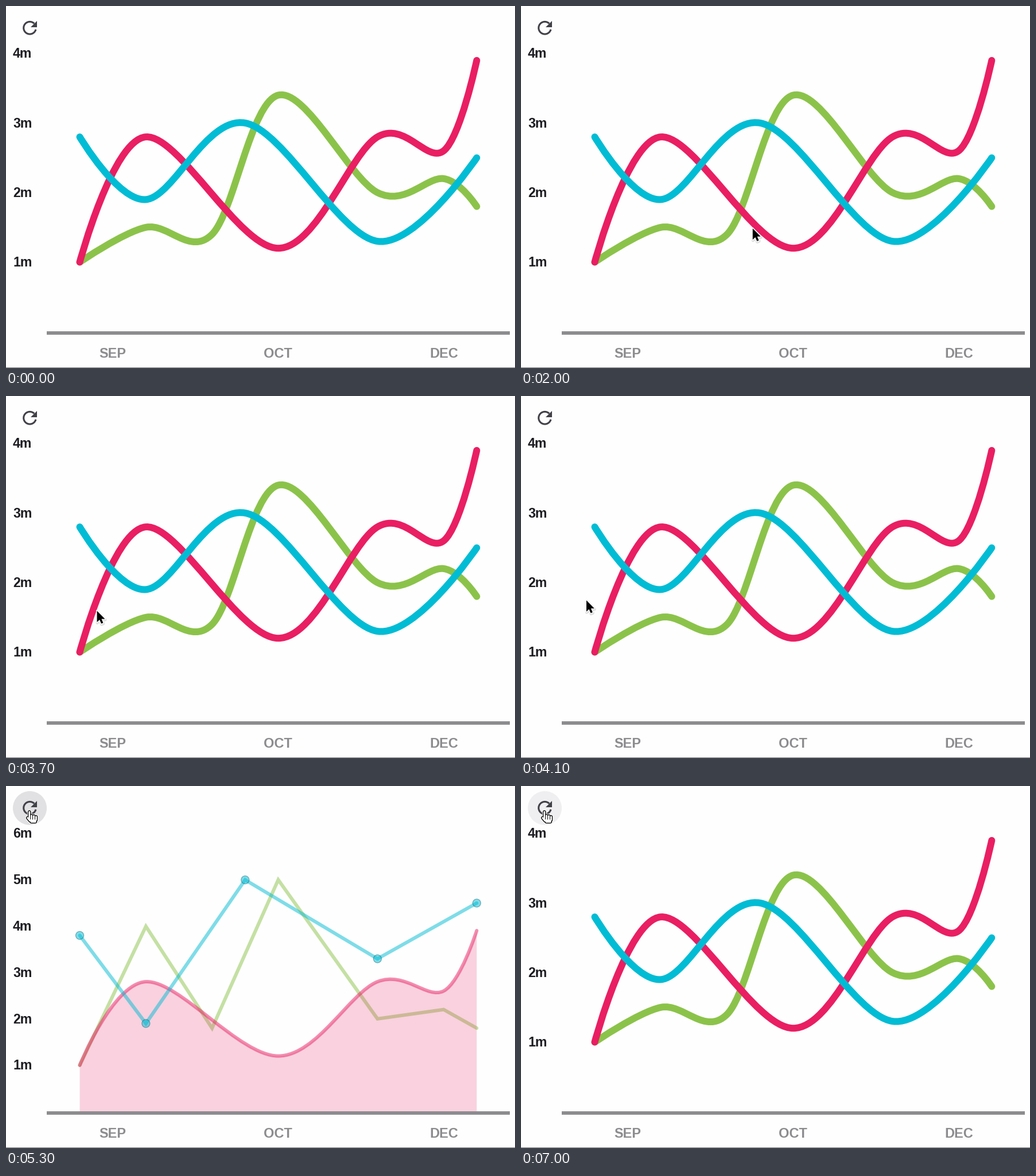
Animation of 887x631 px, one loop 8.6 s. Source, as a matplotlib script:

```python
import numpy as np
import matplotlib.pyplot as plt
from matplotlib.animation import FuncAnimation
from matplotlib.patches import Arc, Circle, PathPatch, Polygon, Rectangle
from matplotlib.path import Path

W, H, DPI = 887, 631, 64
PT = 72 / DPI                      # points per pixel
STEP, LOOP = 100, 8600
BASE, PLOT_H = 567.7, 485          # zero line and height of the value range
X0, DX = 128.5, 57.65

GREEN, PINK, CYAN = "#8bc34a", "#e91e63", "#00bcd4"
GREY, INK, ICON_INK = "#8c8c8f", "#1b1b20", "#414148"

# colour, {slot: value} in the smooth view, changed values in the straight view
SERIES = [
    (GREEN, {0: 1, 2: 1.5, 4: 1.4, 6: 3.4, 9: 2, 11: 2.2, 12: 1.8},
     {2: 4, 4: 1.8, 6: 5}),
    (PINK, {0: 1, 2: 2.8, 6: 1.2, 9: 2.8, 11: 2.6, 12: 3.9}, {}),
    (CYAN, {0: 2.8, 2: 1.9, 5: 3, 9: 1.3, 12: 2.5},
     {0: 3.8, 5: 5, 9: 3.3, 12: 4.5}),
]

POINTER_IN, HAND_FROM, HOVER = 400, 4700, 5000
TO_STRAIGHT, TO_SMOOTH, MORPH = 5010, 6410, 300

fig = plt.figure(figsize=(W / DPI, H / DPI), dpi=DPI, facecolor="#fefefe")
ax = fig.add_axes([0, 0, 1, 1])
ax.set_xlim(0, W)
ax.set_ylim(H, 0)
ax.axis("off")


def add(patch, z):
    patch.set_zorder(z)
    return ax.add_patch(patch)


def label(x, y, text, size, color, ha):
    return ax.text(x, y, text, fontsize=size * PT, color=color, ha=ha,
                   va="baseline", family="Liberation Sans", weight="bold")


def level(values, top):
    return BASE - np.asarray(values) * PLOT_H / top


def progress(now, start, end):
    return min(max((now - start) / (end - start), 0), 1)


def quad(t):
    return 2 * t * t if t < 0.5 else 1 - 2 * (1 - t) ** 2


def glide(now, start, end):
    t = progress(now, start, end)
    return t * t * (3 - 2 * t)


def curve(points):
    """Cardinal spline as cubic Beziers, mirrored at both ends."""
    p = np.vstack([points[1], points, points[-2]])
    verts = [points[0]]
    for a, b, c, d in zip(p, p[1:], p[2:], p[3:]):
        verts += [b + (c - a) / 6, c - (d - b) / 6, c]
    return Path(verts, [Path.MOVETO] + [Path.CURVE4] * (len(verts) - 1))


def area(path):
    (left, _), (right, _) = path.vertices[0], path.vertices[-1]
    verts = np.vstack([path.vertices, [(right, BASE), (left, BASE)]])
    return Path(verts, list(path.codes) + [Path.LINETO] * 2)


def moved(path, spot):
    return Path(path.vertices + spot, path.codes)


# frame, axis and labels
add(Rectangle((71, 567), 807, 6, color=GREY, lw=0), 6)
add(Rectangle((0, 630), W, 1, color="#77777a", lw=0), 6)
for x, month in ((186, "SEP"), (474, "OCT"), (763, "DEC")):
    label(x, 613, month, 23.5, GREY, "center")
scales = {top: [label(12, level(v, top) + 7.6, f"{v}m", 23, INK, "left")
                for v in range(1, top + 1)] for top in (4, 6)}

# reload button
disc = add(Circle((41.5, 38.5), 29.5, lw=0), 1)
UNIT, CENTER = 1.54, np.array([41.5, 38.2])
add(Arc(CENTER, 14 * UNIT, 14 * UNIT, theta1=14.5, theta2=315, color=ICON_INK,
        lw=2 * UNIT * PT, capstyle="butt"), 2)
add(Polygon(CENTER + UNIT * np.array([(1, -1), (8, -1), (8, -8)]),
            color=ICON_INK, lw=0), 2)

# chart
EMPTY = Path([(0, 0), (1, 1)])
lines = [add(PathPatch(EMPTY, fill=False, ec=color, capstyle="round",
                       joinstyle="miter"), 3 + i / 10)
         for i, (color, *_) in enumerate(SERIES)]
fill = add(PathPatch(EMPTY, fc=PINK, lw=0), 3.05)
dots = [add(Circle((0, 0), 7, fc=(0, 0.737, 0.831, 0.5),
                   ec=(0, 0.35, 0.42, 0.45), lw=1.2 * PT), 4)
        for _ in SERIES[-1][1]]


def layers(styles, **common):
    """Stacked strokes of one outline, as (colour, width, alpha)."""
    return [add(PathPatch(EMPTY, ec=color, lw=width * PT, alpha=alpha,
                          joinstyle="round", capstyle="round", **common), 7 + i)
            for i, (color, width, alpha) in enumerate(styles)]


ARROW = Path(np.array([(0, 0), (0, 17), (3.9, 13.3), (6.5, 19.2), (9.3, 18),
                       (6.8, 12.2), (12, 12.2), (0, 0)]) * 1.16 + (2, 2.5))
arrow = layers([("k", 5, 0.12), ("w", 3, 1), ("k", 0, 1)], fc="k")

# fingers, thumb and palm are thick strokes
bones = [[(6.7 + 3.9 * i, top), (6.7 + 3.9 * i, 18)]
         for i, top in enumerate((4, 10.5, 11.2, 12.5))]
bones += [[(3.6, 14.5), (8, 19.5)], [(8, 19), (17.8, 19)], [(10, 21.5), (17.3, 21.5)]]
HAND = Path(np.concatenate(bones), [Path.MOVETO, Path.LINETO] * len(bones))
hand = layers([("w", 7.5, 1), ("k", 5.6, 1), ("w", 2.9, 1)], fill=False)


def draw_chart(now):
    straight = TO_STRAIGHT <= now < TO_SMOOTH
    mix = (quad(progress(now, TO_STRAIGHT, TO_STRAIGHT + MORPH))
           - quad(progress(now, TO_SMOOTH, TO_SMOOTH + MORPH)))
    for top, texts in scales.items():
        for text in texts:
            text.set_visible((top == 6) == straight)

    for line, (color, smooth, changed) in zip(lines, SERIES):
        sharp = {**smooth, **changed}
        y = ((1 - mix) * level(list(smooth.values()), 4)
             + mix * level(list(sharp.values()), 6))
        points = np.column_stack([X0 + DX * np.array(list(smooth)), y])
        path = Path(points) if straight and color != PINK else curve(points)
        line.set_path(path)
        line.set_linewidth((12 - 6 * mix) * PT)
        line.set_alpha(1 - 0.5 * mix)
        if color == PINK:
            fill.set_path(area(path))
            fill.set_alpha(0.2 * mix)
        if color == CYAN:
            for dot, point in zip(dots, points):
                dot.set_center(point)
                dot.set_visible(straight)


def draw_button(now):
    click = TO_SMOOTH if now >= TO_SMOOTH - 110 else TO_STRAIGHT
    tone = np.interp(now - click, [-110, 90, 290, 590],
                     [239, 221, 225, 239]) / 255
    disc.set_facecolor((tone, tone, tone + 0.008))
    disc.set_visible(now >= HOVER)


def draw_pointer(now):
    enter = glide(now, POINTER_IN, 1000)
    sweep = progress(now, 1200, 3100)
    x = (607 + 103 * enter - 551 * (1 - (1 - sweep) ** 1.5)
         - 125 * glide(now, 3600, 4800))
    y = 405 - 17 * enter - 16 * sweep ** 2 - 331 * glide(now, 4000, 4700)
    for patches, path, shown in (
            (arrow, ARROW, POINTER_IN <= now < HAND_FROM),
            (hand, HAND, now >= HAND_FROM)):
        for patch in patches:
            patch.set_visible(shown)
            patch.set_path(moved(path, (x, y)))
    arrow[0].set_path(moved(ARROW, (x + 0.5, y + 1.5)))


def update(frame):
    now = frame * STEP
    draw_chart(now)
    draw_button(now)
    draw_pointer(now)
    return []


anim = FuncAnimation(fig, update, frames=LOOP // STEP, interval=STEP,
                     repeat=True, repeat_delay=0, blit=False)
plt.show()
```
